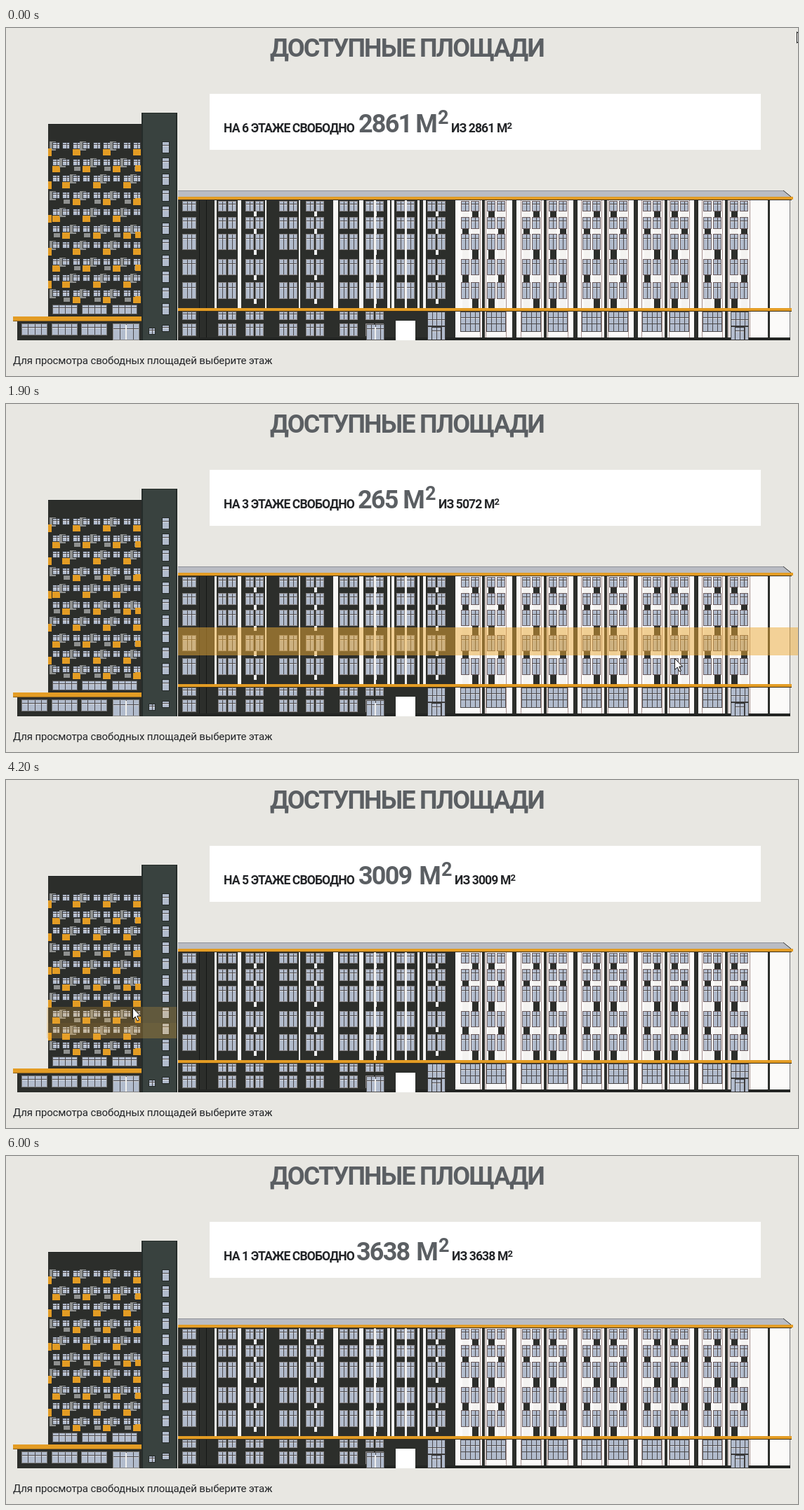
Recreate the animation shown at these times as an HTML page with a canvas. Size 1128x497 px, loop 6400 ms.

```html
<!DOCTYPE html>
<html lang="ru">
<head>
<meta charset="utf-8">
<title>Доступные площади</title>
<style>
html, body { margin: 0; width: 100%; height: 100%; overflow: hidden; background: #e8e7e2; }
svg, canvas { position: absolute; left: 0; top: 0; width: 1128px; height: 497px; }
text { font-family: Roboto, "Open Sans", sans-serif; letter-spacing: -0.05em; font-weight: 700; fill: #222427; }
.big { font-size: 36px; fill: #5b5f63; }
.bigSup { font-size: 27px; fill: #5b5f63; }
.mid { font-size: 17.5px; }
.sup { font-size: 13px; }
.note { font-size: 15px; font-weight: 400; letter-spacing: -0.01em; }
.end { text-anchor: end; }
</style>
</head>
<body>
<svg viewBox="0 0 1128 497">
  <rect x="290" y="94" width="785" height="80" fill="#fff"/>
  <text class="big" x="376" y="41">ДОСТУПНЫЕ ПЛОЩАДИ</text>
  <text class="mid" x="310" y="148.5" id="floor"></text>
  <text class="big" y="149" id="free"></text>
  <text class="big end" y="149" id="unit">М</text>
  <text class="bigSup" y="137" id="unitSup">2</text>
  <text class="mid" y="148.5" id="total"></text>
  <text class="note" x="10" y="480">Для просмотра свободных площадей выберите этаж</text>
</svg>
<canvas id="stage" width="1128" height="497"></canvas>
<script>
const LOOP = 6400, STEP = 100, FADE = 200;
const $ = id => document.getElementById(id);
const ctx = $('stage').getContext('2d');
const DARK = '#2c2e2b', ORANGE = '#e39c24', GREY = '#8f9190', GLASS = '#b2bccd';

// ---------- building ----------
const house = document.createElement('canvas');
house.width = 1128;
house.height = 497;
const g = house.getContext('2d');

function box(color, x, y, w, h) {
  g.fillStyle = color;
  g.fillRect(x, y, w, h);
}

function pane(x, y, w, h, frame = '#716b6d', cols = 2) {
  box(frame, x, y, w, h);
  box(GLASS, x + 1, y + 1, w - 2, h - 2);
  const bar = Math.round(h * .28);
  box('#4b484b', x + 1, y + bar, w - 2, 1);
  box('#d9dce2', x + 1, y + bar + 1, w - 2, 1);
  for (let i = 1; i < cols; i++) box('#4b484b', Math.round(x + i * w / cols), y + 1, 1, h - 2);
}

const leftTops = [451, 412, 392, 369, 347, 324, 300, 277, 253, 229, 205, 182, 160];
const rightTops = [451, 402, 359, 319, 288, 271, 246];

function drawTower() {
  box(DARK, 60, 137, 133, 275);
  box('#1f2221', 60, 137, 133, 1);
  for (let f = 12; f >= 3; f--) {
    const y = leftTops[f], row = 12 - f, top = y + (row ? 5 : 3);
    for (let c = 0; c < 9; c++) {
      const x = 66 + Math.round(c * 14.4), kind = (c + row * 2) % 3;
      if (kind === 2) box(ORANGE, x, top + 9, 11, 10);
      if (kind === 0) box(GREY, x - 4, top - 1, 9, 13);
      if (kind === 1 && row % 2) box(GREY, x + 2, top + 11, 9, 6);
      pane(x, top, 11, 10, '#35383a');
    }
    if (row % 2 === 0) box(ORANGE, 60, top + 9, 5, 11);
    else box(ORANGE, 184, top + 9, 8, 9);
  }
  for (const x of [66, 108, 151]) pane(x, 395, 36, 14, '#555', 4);

  box('#39423f', 193, 121, 50, 325);
  box('#252c2a', 193, 121, 50, 1);
  box('#252c2a', 193, 121, 2, 325);
  box('#252c2a', 242, 121, 2, 325);
  for (let i = 0; i < 11; i++) pane(222, 162 + Math.round(i * 23.1), 11, 17, '#242928', 1);
  pane(222, 424, 11, 10, '#242928', 1);
  pane(203, 428, 10, 10, '#242928');

  box(DARK, 16, 419, 177, 27);
  for (const x of [22, 65, 107]) pane(x, 422, 37, 17, '#777', 4);
  pane(152, 422, 38, 24, '#888', 4);
  box('#f0f0ee', 170, 424, 2, 21);
  box(ORANGE, 10, 412, 183, 7);
  box('#8a6220', 10, 418, 183, 1);
}

const bays = [302, 341, 389, 427, 475, 512, 556, 600, 648, 685, 735, 773, 821, 859, 907, 946, 993, 1031];
const rows = [[247, 15], [270, 17], [294, 23], [330, 23], [363, 24]];

function drawBay(x, i) {
  const light = x > 630;
  if (!light) box(DARK, x - 2, 246, 30, 196);
  for (let r = 0; r < rows.length; r++) {
    const [y, h] = rows[r];
    const gap = (r < 4 ? rows[r + 1][0] : 400) - y - h;
    for (let k = 0; k < 2; k++) {
      const wx = x + k * 14;
      if (light) box((i + r + k) % 2 ? DARK : '#f4f3f1', wx + 2, y + h, 9, gap);
      pane(wx, y, 12, h, light ? '#6a5b5d' : '#8b8788');
    }
    if (!light && i % 2) box('#eee', x + 12, y + h, 4, Math.min(gap, 7));
  }
  if (x === 512 || x === 556) box('#f5f4f2', x + 12, 246, 3, 154);
  if (light && x < 1031) {
    pane(x - 1, 405, 28, 29, '#4c4a4b', 4);
    box('#4c4a4b', x, 422, 26, 1);
  } else if (!light && x !== 556 && x !== 600) {
    for (let k = 0; k < 2; k++) {
      pane(x + k * 14, 405, 12, 12, '#8b8788');
      pane(x + k * 14, 422, 12, 18, '#8b8788');
    }
  }
}

function drawMain() {
  box(DARK, 245, 246, 385, 200);
  box('#fbfaf9', 630, 246, 487, 200);
  for (const [x, w] of [[297, 4], [330, 5], [369, 2], [416, 3], [466, 8], [503, 6], [543, 4], [549, 4], [586, 3], [594, 4]])
    box('#f7f6f4', x, 246, w, 154);
  box('#151715', 285, 246, 1, 200);
  box('#151715', 275, 246, 1, 200);
  for (const [y, h] of rows) pane(251, y, 20, h, '#777', 3);
  pane(251, 405, 20, 12, '#777', 3);
  pane(251, 422, 20, 18, '#777', 3);

  box(DARK, 628, 246, 12, 196);
  for (let i = 8; i < 17; i++) {
    const start = bays[i] + 26, gap = bays[i + 1] - start;
    box(DARK, start + Math.round(gap * .4), 246, gap > 15 ? 6 : 4, 196);
    box('#a58f8d', start + 1, 246, 1, 196);
    box('#a58f8d', start + gap - 2, 246, 1, 196);
  }
  bays.forEach(drawBay);
  box(DARK, 1085, 246, 3, 196);
  box('#77777a', 1116, 246, 1, 200);
  box('#a58f8d', 1059, 246, 1, 196);

  box('#232523', 245, 442, 872, 4);
  box('#fff', 555, 418, 28, 28);
  for (const x of [600, 1032]) {
    pane(x, 405, 26, 41, '#3b3a3a', 4);
    box('#3b3a3a', x, 425, 26, 2);
    pane(x + 6, 427, 14, 19, '#333');
  }
  pane(513, 423, 26, 23, '#555', 4);
  box('#eee', 525, 427, 2, 18);

  g.fillStyle = '#b9bcc3';
  g.beginPath();
  g.moveTo(245, 232);
  g.lineTo(1107, 232);
  g.lineTo(1119, 241);
  g.lineTo(245, 241);
  g.fill();
  g.strokeStyle = '#333';
  g.beginPath();
  g.moveTo(1107, 232);
  g.lineTo(1118, 241);
  g.stroke();
  box('#8d9097', 245, 232, 862, 1);
  box(ORANGE, 245, 241, 876, 4);
  box('#3a2f1c', 245, 245, 874, 1);
  box(ORANGE, 245, 400, 874, 4);
  box('#3a2f1c', 245, 404, 874, 1);
}

drawMain();
drawTower();

// ---------- motion ----------
// [floor, start ms]; negative floors belong to the tower, 0 is none
const visits = [
  [6, 180], [5, 400], [4, 600], [5, 850], [4, 1120], [3, 1450], [2, 1910], [1, 2200],
  [-1, 3200], [-2, 3800], [-3, 3880], [-4, 3950], [-5, 4110], [-6, 4360], [-7, 4500],
  [-8, 4600], [-9, 4700], [-10, 4800], [-11, 4900], [-12, 5000], [0, 5450], [-1, 5750], [0, 5800]
];

// [ms, x, y] of the pointer tip
const path = [
  [0, 1126, 5], [100, 1090, 120], [200, 1060, 250], [400, 1040, 268], [700, 1005, 296],
  [900, 1000, 280], [1100, 985, 286], [1300, 980, 301], [1500, 968, 330], [1900, 952, 363],
  [2100, 925, 412], [2500, 839, 418], [2800, 839, 418], [3200, 240, 440], [3400, 150, 438],
  [3700, 150, 438], [4000, 180, 360], [4200, 180, 325], [4400, 178, 316], [5000, 172, 178],
  [5200, 171, 171], [5450, 55, 200], [5700, 8, 340], [5800, 20, 425], [5900, 6, 470], [6000, 0, 520]
];

// free, total, x of the free area, x of the total
const areas = {
  1: [3638, 3638, 499, 635],
  2: [1530, 5036, 501, 633],
  3: [265, 5072, 501, 616],
  4: [113, 2935, 503, 608],
  5: [3009, 3009, 502, 639],
  6: [2861, 2861, 502, 634]
};
const areaOf = f => areas[f] || [543, 543, f > 9 ? 509 : 501, f > 9 ? 625 : 617];
const clamp = v => Math.max(0, Math.min(1, v));

function pointerAt(t) {
  const i = path.findIndex(p => p[0] > t);
  if (i < 0) return [0, 520];
  const [t0, x0, y0] = path[i - 1], [t1, x1, y1] = path[i];
  const k = (t - t0) / (t1 - t0);
  return [Math.round(x0 + (x1 - x0) * k), Math.round(y0 + (y1 - y0) * k)];
}

function drawBand(floor, alpha) {
  const n = Math.abs(floor), tops = floor < 0 ? leftTops : rightTops;
  const x = floor > 0 ? 245 : n === 1 ? 10 : 58;
  ctx.fillStyle = `rgba(235,170,55,${.5 * alpha})`;
  ctx.fillRect(x, tops[n], (floor > 0 ? 1128 : 243) - x, tops[n - 1] - tops[n]);
}

const arrow = new Path2D('M.5 .5V16.5L4.2 13L7 19L9.5 18L6.8 12H11.5Z');

function drawPointer([x, y]) {
  ctx.save();
  ctx.translate(x, y);
  ctx.fillStyle = '#fff';
  ctx.strokeStyle = '#111';
  ctx.fill(arrow);
  ctx.stroke(arrow);
  ctx.restore();
}

let shown;
function showFloor(n) {
  if (n === shown) return;
  shown = n;
  const [free, total, x, end] = areaOf(n);
  $('floor').textContent = `НА ${n} ЭТАЖЕ СВОБОДНО`;
  $('free').textContent = free;
  $('free').setAttribute('x', x);
  $('unit').setAttribute('x', end - 21);
  $('unitSup').setAttribute('x', end - 19);
  $('total').setAttribute('x', end);
  $('total').innerHTML = `ИЗ ${total} М<tspan class="sup" dy="-5">2</tspan>`;
}

function render(t) {
  ctx.clearRect(0, 0, 1128, 497);
  ctx.drawImage(house, 0, 0);
  let current = 6;
  visits.forEach(([floor, on], i) => {
    if (!floor || t < on) return;
    current = Math.abs(floor);
    const off = visits[i + 1][1];
    const alpha = clamp((t - on) / FADE) * (1 - clamp((t - off) / FADE));
    if (alpha > 0) drawBand(floor, alpha);
  });
  showFloor(current);
  drawPointer(pointerAt(t));
}

const begin = performance.now();
function tick() {
  const t = (performance.now() - begin) % LOOP;
  render(Math.floor(t / STEP) * STEP);
  requestAnimationFrame(tick);
}
tick();
</script>
</body>
</html>
```
